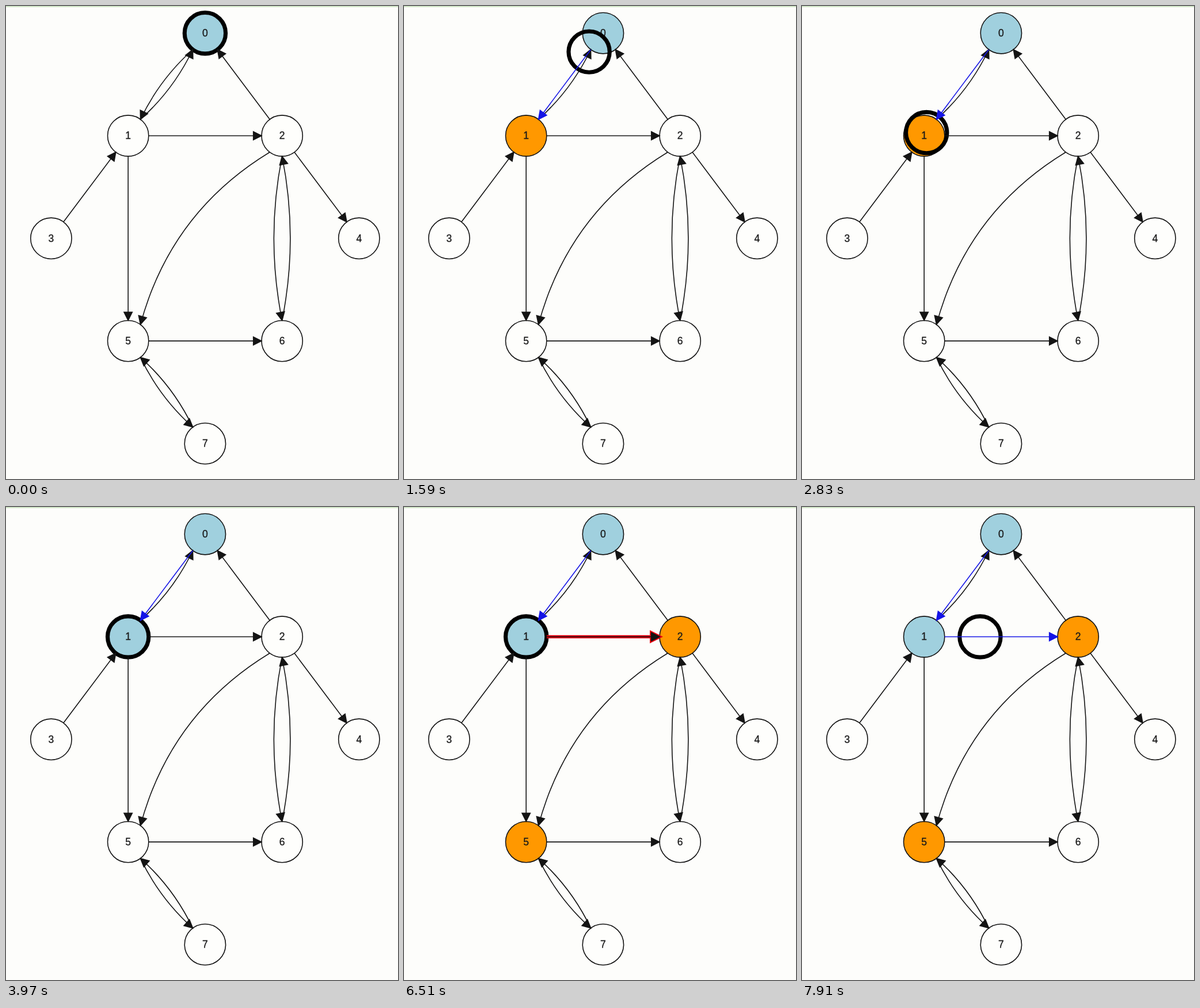
Write an HTML page that moves like this. It is 681 by 822 pixels and loops after 8000 ms.

```html
<!DOCTYPE html>
<html lang="en">
<head>
<meta charset="utf-8">
<title>Graph traversal</title>
<style>
  html, body { margin: 0; width: 100%; height: 100%; overflow: hidden; background: #fdfdfb; }
  svg { display: block; width: 100%; height: 100%; }
  text {
    font: 17.5px "Liberation Sans", Arial, sans-serif;
    text-anchor: middle; fill: #1a1a1a; stroke: #1a1a1a; stroke-width: 0.3px;
  }
</style>
</head>
<body>
<svg id="stage" viewBox="0 0 681 822">
  <rect width="681" height="822" fill="#fdfdfb"/>
  <rect width="681" height="2" fill="#d3e8c9"/>
</svg>
<script>
const SCALE = 1.783;
const RADIUS = 20 * SCALE;
const PEN = 0.9 * SCALE;
const LOOP = 8000;
const MOVE_FRAMES = 33;
const INK = '#141414', BLUE = '#1414e6', RED = '#e6000f';
const UNSEEN = '#fefefc', FRONTIER = '#ff9800', VISITED = '#a0d0de';

// Frame counts at which the traversal advances
const FIRST = { queue: 0, inspect: 14, move: 28, arrive: 61 };
const SECOND = { queue: 93, inspect: 126, move: 158 };

const nodes = [
  [0, 0], [-75, 100], [75, 100], [-150, 200],
  [150, 200], [-75, 300], [75, 300], [0, 400]
].map(([x, y]) => ({ x: 345.9 + x * SCALE, y: 47.2 + y * SCALE }));

// from, to, curve
const links = [
  [0, 1, 0.1], [1, 0, 0.1], [1, 2, 0], [1, 5, 0], [2, 0, 0], [2, 4, 0],
  [2, 5, 0.2], [2, 6, 0.1], [3, 1, 0], [5, 6, 0], [5, 7, 0.1], [6, 2, 0.1], [7, 5, 0.1]
];

const stage = document.getElementById('stage');

function set(el, attrs) {
  for (const name in attrs) el.setAttribute(name, attrs[name]);
}

function add(tag, attrs) {
  const el = document.createElementNS('http://www.w3.org/2000/svg', tag);
  set(el, attrs);
  return stage.appendChild(el);
}

function linkPaths(from, to, curve) {
  const a = nodes[from], b = nodes[to];
  const dist = Math.hypot(b.x - a.x, b.y - a.y);
  const ux = (b.x - a.x) / dist, uy = (b.y - a.y) / dist;
  const x1 = a.x + ux * RADIUS, y1 = a.y + uy * RADIUS;
  const x2 = b.x - ux * RADIUS, y2 = b.y - uy * RADIUS;
  const cx = (x1 + x2) / 2 - (y2 - y1) * curve;
  const cy = (y1 + y2) / 2 + (x2 - x1) * curve;
  const len = Math.hypot(cx - x2, cy - y2);
  const vx = (cx - x2) / len * SCALE, vy = (cy - y2) / len * SCALE;
  const corner = side =>
    `L${x2 + vx * 8 - side * vy * 4} ${y2 + vy * 8 + side * vx * 4}`;
  return {
    line: `M${x1} ${y1}Q${cx} ${cy} ${x2} ${y2}`,
    head: `M${x2} ${y2}${corner(1)}${corner(-1)}Z`
  };
}

function makeArrow(from, to, curve, color) {
  const paths = linkPaths(from, to, curve);
  const pen = { stroke: color, 'stroke-width': PEN };
  const parts = [
    add('path', { d: paths.line, fill: 'none', ...pen }),
    add('path', { d: paths.head, fill: color, ...pen })
  ];
  return {
    show(on) { for (const el of parts) set(el, { visibility: on ? 'visible' : 'hidden' }); },
    width(w) { for (const el of parts) set(el, { 'stroke-width': w }); }
  };
}

const discs = nodes.map(({ x, y }, i) => {
  const disc = add('circle', { cx: x, cy: y, r: RADIUS, fill: UNSEEN, stroke: INK, 'stroke-width': PEN });
  add('text', { x, y: y + 5.8 }).textContent = i;
  return disc;
});
set(discs[0], { fill: VISITED });
const ring = add('circle', { r: RADIUS, fill: 'none', stroke: '#000', 'stroke-width': 4 * SCALE });

const glow01 = makeArrow(0, 1, 0.1, RED);
const glow12 = makeArrow(1, 2, 0, RED);
const arrows = links.map(link => makeArrow(...link, INK));
const tree01 = makeArrow(0, 1, 0, BLUE);
const tree12 = makeArrow(1, 2, 0, BLUE);

// Two quick frames and a long one every 140 ms
function frameAt(ms) {
  const group = Math.floor((ms - 30) / 140);
  const rest = ms - 30 - group * 140;
  return group * 3 + Math.min(2, Math.floor(rest / 20));
}

const progress = (n, start) => Math.max(0, Math.min(1, (n - start) / MOVE_FRAMES));
const mix = (a, b, p) => a + (b - a) * p;

function placeRing(n) {
  const from = n < SECOND.move ? 0 : 1;
  const p = progress(n, from ? SECOND.move : FIRST.move);
  const a = nodes[from], b = nodes[from + 1];
  set(ring, { cx: mix(a.x, b.x, p), cy: mix(a.y, b.y, p) });
}

function render(ms) {
  const n = frameAt(ms);
  const second = n >= SECOND.queue ? FRONTIER : UNSEEN;
  set(discs[1], { fill: n >= FIRST.arrive ? VISITED : n >= FIRST.queue ? FRONTIER : UNSEEN });
  set(discs[2], { fill: second });
  set(discs[5], { fill: second });
  placeRing(n);

  // The highlight swells and shrinks between 3 and 5 units
  const glow = (3 + Math.abs((n / 14) % 4 - 2)) * SCALE;
  glow01.width(glow);
  glow12.width(glow);
  glow01.show(n >= FIRST.inspect && n < FIRST.move);
  glow12.show(n >= SECOND.inspect && n < SECOND.move);
  arrows[0].show(n < FIRST.move);
  arrows[2].show(n < SECOND.move);
  tree01.show(n >= FIRST.move);
  tree12.show(n >= SECOND.move);
}

const begin = performance.now();
function tick() {
  render((performance.now() - begin) % LOOP);
  requestAnimationFrame(tick);
}
render(0);
requestAnimationFrame(tick);
</script>
</body>
</html>
```
